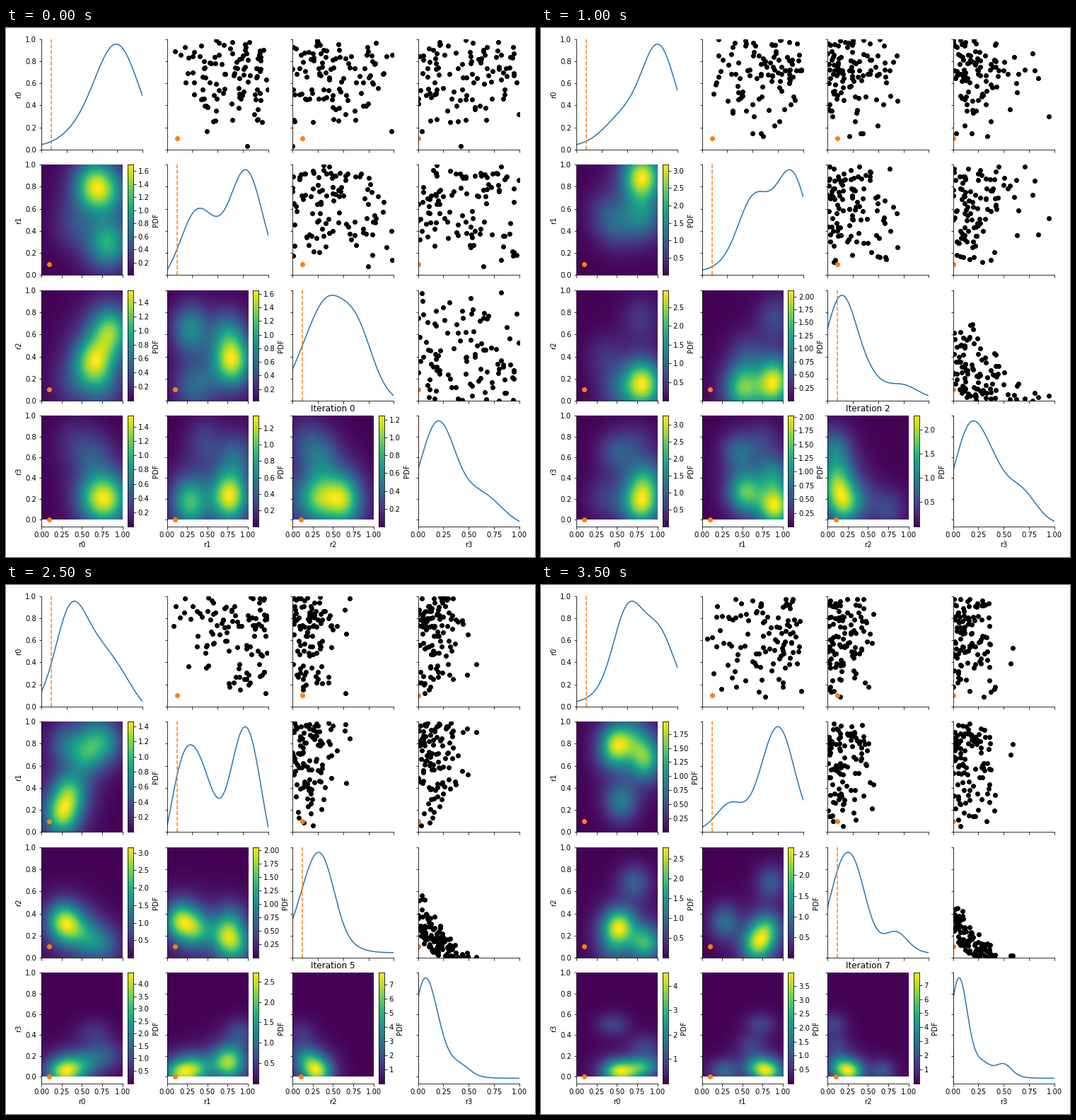
Write a matplotlib script that moves like this. It is 748 px wide and 748 px high and loops after 4 s.

```python
import numpy as np
import matplotlib.pyplot as plt
from matplotlib.animation import FuncAnimation
from matplotlib.ticker import MaxNLocator

SIZE, DPI = 748, 72
LEFT, TOP, PITCH = 50, 15.7, 177.55
WIDTH, HEIGHT = 143.2, 156.2
NAMES = ["r0", "r1", "r2", "r3"]
TRUTH = [0.1, 0.1, 0.1, 0.0]
PAIRS = [(i, j) for i in range(4) for j in range(i)]
FINE, COARSE = np.linspace(0, 1, 200), np.linspace(0, 1, 90)

curves, maps, ranges = {}, {}, {}


def kernels(step, blobs):
    """Yield (weight, centre, sigma): each blob has a core and a soft halo."""
    sigma = np.array([0.165, 0.15, 0.15, 0.16])
    sigma = sigma * np.exp(-np.array([0.03, 0.03, 0.05, 0.11]) * step)
    for k, centre in enumerate(blobs):
        for share, scale in ((0.65, 1), (0.35, 1.8)):
            yield share * 0.78**k, centre, sigma * scale


def bell(x, centre, sigma):
    return np.exp(-((x - centre) / sigma) ** 2 / 2) / sigma


def posterior(step, peaks, *blobs):
    """Marginals of a 4-D mixture; blobs are centres, strongest first."""
    parts = list(kernels(step, blobs))
    for var in range(4):
        y = sum(w * bell(FINE, c[var], s[var]) for w, c, s in parts)
        curves[step, var] = (y - y.min()) / np.ptp(y)
    for (row, col), peak in zip(PAIRS, peaks):
        z = sum(w * np.outer(bell(COARSE, c[row], s[row]), bell(COARSE, c[col], s[col]))
                for w, c, s in parts)
        maps[step, row, col] = (z - z.min()) / np.ptp(z)
        ranges[step, row, col] = peak * np.array([z.min() / z.max(), 1])


def blend(step):
    """Halfway state between the two neighbouring iterations."""
    for table in (curves, maps, ranges):
        for key in [k for k in table if k[0] == step - 1]:
            rest = key[1:]
            table[(step, *rest)] = (table[key] + table[(step + 1, *rest)]) / 2


def cloud(step):
    """Samples in a band of the r2-r3 plane that tightens with each step."""
    rng = np.random.default_rng(40 + step)
    shapes = [(2.4, 1.25), (2, 1.1), (0.9, 1.2 + 0.4 * step), (0.9, 1.2 + 0.5 * step)]
    pts = np.column_stack([rng.beta(a, b, 4000) for a, b in shapes])
    reach = pts[:, 2] ** 0.6 + pts[:, 3] ** 0.6
    inner = 0.48 * (1 - np.exp(-step))
    outer = 0.8 + 1.1 * np.exp(-step / 2)
    return pts[(reach > inner) & (reach < outer)][:105]


posterior(0, (1.70, 1.57, 1.65, 1.55, 1.35, 1.245),
          (.65, .78, .35, .2), (.85, .28, .65, .15), (.85, .75, .6, .25),
          (.65, .85, .35, .6), (.75, .27, .12, .2), (.4, .45, .15, .75))
posterior(1, (2.27, 2.93, 1.96, 2.16, 1.71, 2.25),
          (.84, .62, .15, .15), (.83, .85, .15, .45), (.85, .25, .17, .32),
          (.6, .62, .45, .45), (.8, .62, .82, .12), (.75, .85, .1, .8),
          (.25, .5, .25, .3))
posterior(2, (3.17, 2.95, 2.12, 3.26, 2.02, 2.285),
          (.8, .9, .2, .13), (.82, .52, .12, .28), (.85, .88, .12, .42),
          (.5, .45, .1, .65), (.8, .9, .75, .1), (.35, .55, .4, .2),
          (.75, .75, .05, .75))
posterior(3, (2.88, 2.31, 2.42, 2.43, 2.86, 2.9),
          (.55, .88, .25, .1), (.38, .6, .08, .27), (.78, .85, .12, .22),
          (.65, .8, .1, .75), (.55, .85, .85, .07), (.75, .75, .5, .08),
          (.4, .2, .1, .2))
posterior(5, (1.46, 3.16, 2.06, 4.45, 2.72, 7.82),
          (.25, .15, .33, .03), (.35, .35, .26, .07), (.55, .7, .2, .13),
          (.8, .8, .12, .2), (.3, .8, .33, .05), (.65, .9, .1, .42))
posterior(7, (1.97, 2.79, 2.68, 4.53, 3.97, 7.88),
          (.5, .8, .25, .04), (.85, .68, .14, .1), (.55, .27, .32, .05),
          (.72, .85, .68, .05), (.45, .72, .07, .5), (.85, .6, .1, .3))
blend(4)
blend(6)
clouds = [cloud(step) for step in range(8)]

fig = plt.figure(figsize=(SIZE / DPI, SIZE / DPI), dpi=DPI, facecolor="white")


def add_axes(x, y, w, h):
    return fig.add_axes([x / SIZE, 1 - (y + h) / SIZE, w / SIZE, h / SIZE])


def add_bar(x, y):
    cax = add_axes(x, y, HEIGHT / 20, HEIGHT)
    ramp = cax.imshow(np.linspace(0, 1, 256)[:, None], origin="lower", aspect="auto")
    cax.set_xticks([])
    cax.yaxis.tick_right()
    cax.yaxis.set_label_position("right")
    cax.yaxis.set_major_locator(MaxNLocator(9, steps=[1, 2, 2.5, 5, 10]))
    cax.set_ylabel("PDF")
    return cax, ramp


lines, images, bars, dots = {}, {}, {}, {}
title = None
for row in range(4):
    for col in range(4):
        x, y = LEFT + PITCH * col, TOP + PITCH * row
        ax = add_axes(x, y, WIDTH * (0.8 if col < row else 1), HEIGHT)
        ax.spines[["top", "right"]].set_visible(False)
        if row == col:
            lines[row], = ax.plot(FINE, FINE, "C0", transform=ax.get_xaxis_transform())
            ax.axvline(TRUTH[row], color="C1", ls="--")
        else:
            if col < row:
                images[row, col] = ax.imshow(np.zeros((90, 90)), origin="lower",
                                             extent=(0, 1, 0, 1), aspect="auto",
                                             vmin=0, vmax=1, interpolation="bilinear")
                bars[row, col] = add_bar(x + WIDTH * 0.85, y)
            else:
                dots[row, col] = ax.scatter([], [], color="k")
            ax.scatter(TRUTH[col], TRUTH[row], color="C1", zorder=2)
        ax.set(xlim=(0, 1), ylim=(-0.066 if row == 3 else 0, 1),
               xticks=np.linspace(0, 1, 5), yticks=np.linspace(0, 1, 6))
        if row == 3:
            ax.set_xlabel(NAMES[col])
        else:
            ax.set_xticklabels([])
        if col == 0:
            ax.set_ylabel(NAMES[row])
        else:
            ax.set_yticklabels([])
        if (row, col) == (3, 2):
            title = ax.set_title("")


def update(step):
    title.set_text(f"Iteration {step}")
    for var, line in lines.items():
        line.set_ydata((0.05 + curves[step, var]) / 1.1)
    for (row, col), image in images.items():
        image.set_data(maps[step, row, col])
        lo, hi = ranges[step, row, col]
        cax, ramp = bars[row, col]
        ramp.set_extent((0, 1, lo, hi))
        cax.set_ylim(lo, hi)
    for (row, col), scatter in dots.items():
        scatter.set_offsets(clouds[step][:, [col, row]])


anim = FuncAnimation(fig, update, frames=8, interval=500, repeat=True,
                     repeat_delay=0, blit=False)
plt.show()
```
